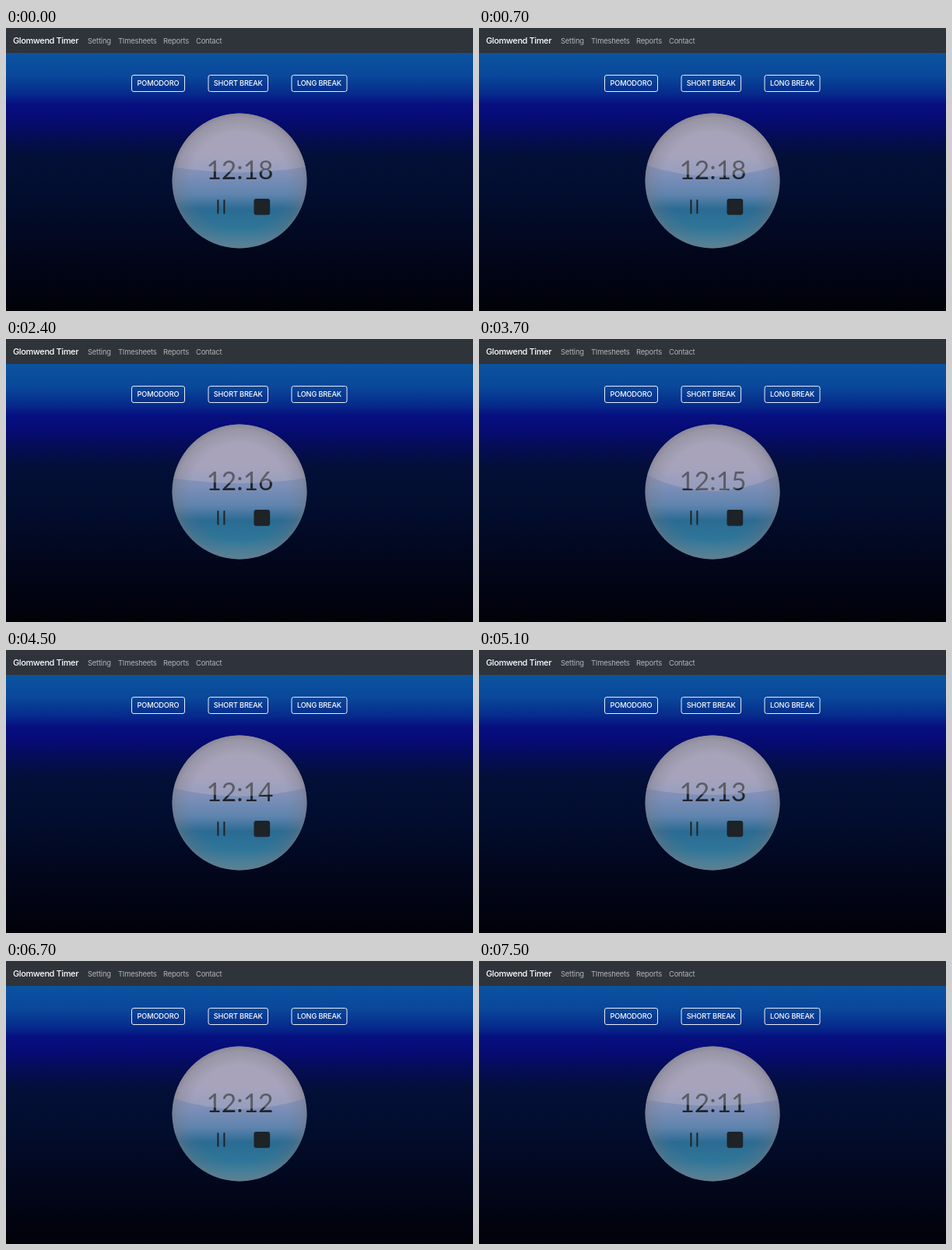
An HTML page for the animation above (7.6 s loop, 600x363 px).

```html
<!DOCTYPE html>
<html lang="en">
<head>
<meta charset="utf-8">
<title>Timer</title>
<style>
  html, body { margin: 0; width: 100%; height: 100%; overflow: hidden; background: #010108; }
  svg { display: block; width: 600px; height: 363px; }
  text { font-family: Inter, Roboto, sans-serif; font-size: 9.4px; letter-spacing: -.2px; }
  .brand { font-size: 11px; font-weight: 500; letter-spacing: -.4px; fill: #fff; }
  .link { fill: #b3b5b8; }
  .btn text { fill: #fff; font-weight: 500; font-size: 9.2px; letter-spacing: -.15px; text-anchor: middle; }
  .btn rect { fill: none; stroke: #e9edf5; stroke-width: 1; }
  #clock { font: 400 33.5px Lato, sans-serif; letter-spacing: 0; text-anchor: middle; fill: #20252a; }
</style>
</head>
<body>
<svg viewBox="0 0 600 363">
  <defs>
    <linearGradient id="sky" gradientUnits="userSpaceOnUse" x1="0" y1="32" x2="0" y2="363">
      <stop offset="0" stop-color="#0b539f"/>
      <stop offset=".09" stop-color="#09479a"/>
      <stop offset=".16" stop-color="#062a8b"/>
      <stop offset=".2" stop-color="#070f80"/>
      <stop offset=".25" stop-color="#060b76"/>
      <stop offset=".33" stop-color="#050d52"/>
      <stop offset=".4" stop-color="#030f37"/>
      <stop offset=".55" stop-color="#020d2f"/>
      <stop offset=".72" stop-color="#020820"/>
      <stop offset=".88" stop-color="#020413"/>
      <stop offset="1" stop-color="#010108"/>
    </linearGradient>
    <linearGradient id="water" gradientUnits="userSpaceOnUse" x1="0" y1="109" x2="0" y2="283">
      <stop offset="0" stop-color="#9896ac"/>
      <stop offset=".3" stop-color="#9a98b6"/>
      <stop offset=".46" stop-color="#7d8fb8"/>
      <stop offset=".6" stop-color="#5f84ae"/>
      <stop offset=".71" stop-color="#2b6b93"/>
      <stop offset=".85" stop-color="#2f7699"/>
      <stop offset="1" stop-color="#4d8aa4"/>
    </linearGradient>
    <radialGradient id="rim">
      <stop offset=".72" stop-color="#74747c" stop-opacity="0"/>
      <stop offset=".93" stop-color="#74747c" stop-opacity=".28"/>
      <stop offset="1" stop-color="#74747c" stop-opacity=".55"/>
    </radialGradient>
    <clipPath id="ball"><circle cx="300" cy="196" r="86.5"/></clipPath>
  </defs>

  <rect width="600" height="363" fill="url(#sky)"/>
  <rect width="600" height="32" fill="#2f333a"/>
  <text class="brand" x="9" y="20">Glomwend Timer</text>
  <g id="menu"></g>
  <g id="buttons"></g>

  <circle cx="300" cy="196" r="86.5" fill="url(#water)"/>
  <text id="clock" x="300.5" y="193.5">12:18</text>
  <path id="gloss" clip-path="url(#ball)" fill="#bdb6c4" fill-opacity=".38"/>
  <circle cx="300" cy="196" r="86.5" fill="url(#rim)"/>
  <g fill="#1d2327">
    <rect x="271.4" y="220" width="2" height="18.5" rx="1"/>
    <rect x="279.4" y="220" width="2" height="18.5" rx="1"/>
    <rect x="318.5" y="219" width="20.7" height="20.7" rx="3"/>
  </g>
</svg>
<script>
  const LOOP = 7600, SWAY = 2400;
  const $ = id => document.getElementById(id);

  const links = [[105, 'Setting'], [144, 'TImesheets'], [202, 'Reports'], [244, 'Contact']];
  const buttons = [[161.5, 68, 'POMODORO'], [260, 76.5, 'SHORT BREAK'], [367, 71, 'LONG BREAK']];

  $('menu').innerHTML = links.map(([x, label]) =>
    `<text class="link" x="${x}" y="19.6">${label}</text>`).join('');
  $('buttons').innerHTML = buttons.map(([x, w, label]) =>
    `<g class="btn"><rect x="${x}" y="60.5" width="${w}" height="21" rx="2.5"/>` +
    `<text x="${x + w / 2}" y="74.4">${label}</text></g>`).join('');

  // The gloss sags in the middle while its ends rise, then flattens again.
  function glossPath(t) {
    const sag = (1 - Math.cos(2 * Math.PI * (t - 100) / SWAY)) / 2;
    const end = 178 - 5 * sag, mid = 185 + 10 * sag;
    return `M213 105H387V${end}Q300 ${2 * mid - end} 213 ${end}Z`;
  }

  function draw(t) {
    $('clock').textContent = '12:' + (18 - Math.floor(t / 1000));
    $('gloss').setAttribute('d', glossPath(t));
  }

  const start = performance.now();
  function tick() {
    draw((performance.now() - start) % LOOP);
    requestAnimationFrame(tick);
  }
  draw(0);
  requestAnimationFrame(tick);
</script>
</body>
</html>
```
